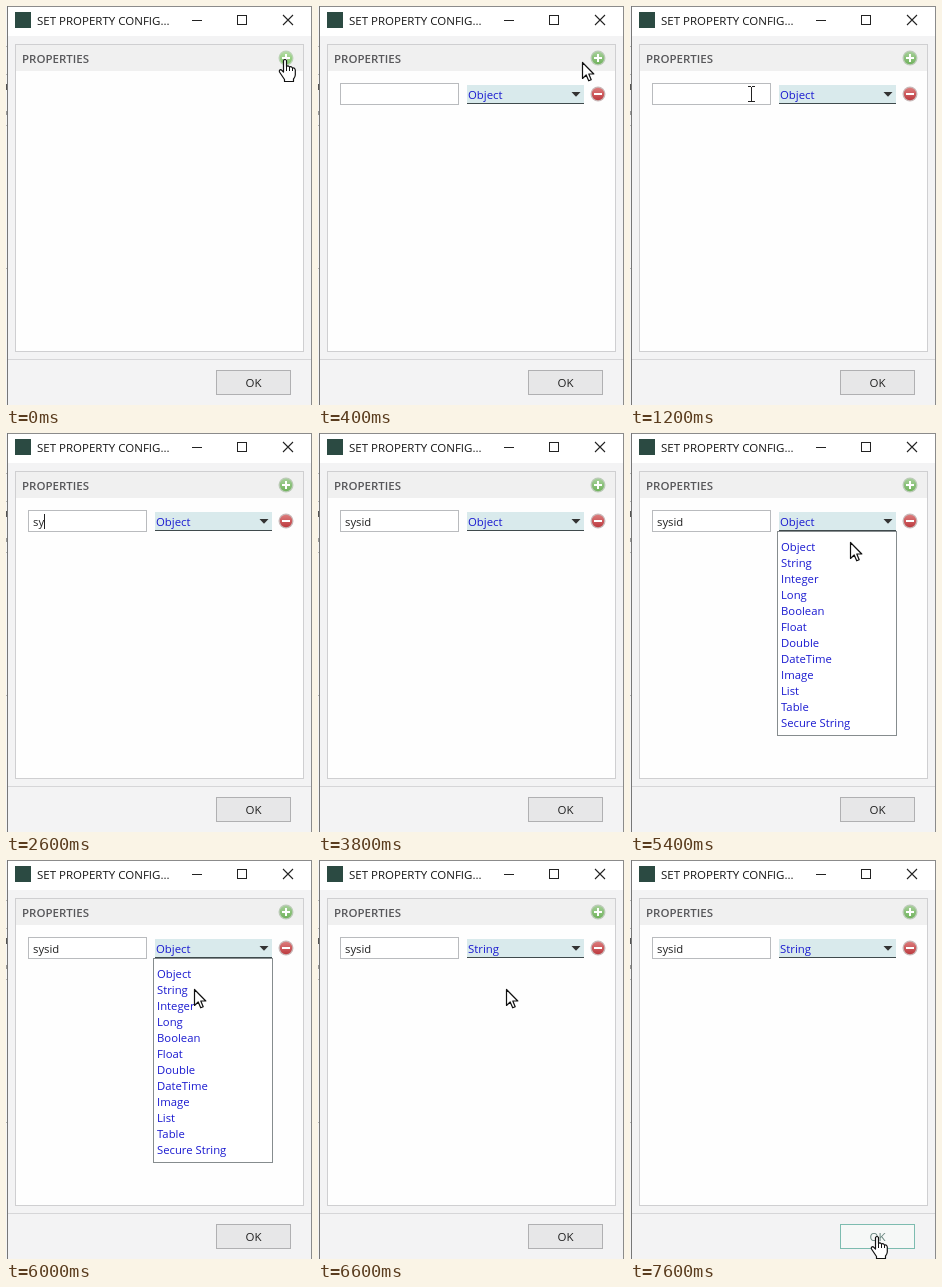
An HTML page with a canvas for the animation above (7800 ms loop, 306x399 px).

```html
<!DOCTYPE html>
<html lang="en">
<head>
<meta charset="utf-8">
<title>Set property dialog</title>
<style>
  html, body { margin: 0; width: 100%; height: 100%; overflow: hidden; background: #f3f3f4; }
  canvas { display: block; }
</style>
</head>
<body>
<canvas id="stage" width="306" height="399"></canvas>
<script>
const ctx = document.getElementById('stage').getContext('2d');
const LOOP = 7800, TICK = 200;
const BLUE = '#1a1ad0';
const TYPES = ['Object', 'String', 'Integer', 'Long', 'Boolean', 'Float', 'Double',
  'DateTime', 'Image', 'List', 'Table', 'Secure String'];

// Pointer hot spot: time, x, y
const PATH = [
  [0, 279, 53], [200, 279, 53], [1200, 121, 88], [4000, 125, 88], [4800, 239, 85],
  [5000, 239, 85], [5400, 220, 109], [5800, 188, 129], [6600, 188, 129], [7600, 247, 376]
];
// Typed text: time, number of letters
const KEYS = [[2000, 1], [2600, 2], [2800, 3], [3000, 4], [3200, 5]];

const ease = u => (1 - Math.cos(Math.PI * u)) / 2;
const between = (t, a, b) => t >= a && t < b;
const inside = (p, x, y, w, h) => between(p.x, x, x + w) && between(p.y, y, y + h);

function rect(x, y, w, h, fill) {
  ctx.fillStyle = fill;
  ctx.fillRect(x, y, w, h);
}

function box(x, y, w, h, fill, border) {
  rect(x, y, w, h, border);
  rect(x + 1, y + 1, w - 2, h - 2, fill);
}

function text(str, x, y, color, size = 11.5, weight = 400) {
  ctx.font = `${weight} ${size}px "Open Sans", "Noto Sans", sans-serif`;
  ctx.fillStyle = color;
  ctx.fillText(str, x, y);
}

function lines(color, width, ...paths) {
  ctx.strokeStyle = color;
  ctx.lineWidth = width;
  ctx.beginPath();
  for (const [x1, y1, x2, y2] of paths) {
    ctx.moveTo(x1, y1);
    ctx.lineTo(x2, y2);
  }
  ctx.stroke();
}

function pointerAt(t) {
  let i = PATH.length - 1;
  while (PATH[i][0] > t) i--;
  const [t0, x0, y0] = PATH[i];
  const [t1, x1, y1] = PATH[i + 1] || [LOOP, x0, y0];
  const u = ease((t - t0) / (t1 - t0));
  return { x: Math.round(x0 + (x1 - x0) * u), y: Math.round(y0 + (y1 - y0) * u) };
}

function drawFrame() {
  rect(0, 0, 306, 399, '#f3f3f4');
  rect(0, 0, 306, 30, '#ffffff');
  rect(0, 0, 306, 1, '#8b8b8b');
  rect(0, 0, 1, 399, '#f4f4f4');
  for (const y of [40, 68, 119, 262]) rect(0, y, 1, 1, '#b5b5b5');
  rect(0, 78, 1, 6, '#555');
  rect(0, 105, 1, 4, '#999');
  rect(1, 0, 1, 399, '#777');
  rect(305, 0, 1, 399, '#8b8b8b');

  ctx.fillStyle = '#2b4a42';
  ctx.fillRect(9, 6, 16, 16);
  text('SET PROPERTY CONFIG...', 31, 18.5, '#161616');
  rect(186, 14, 10, 1, '#222');
  ctx.strokeStyle = '#222';
  ctx.lineWidth = 1;
  ctx.strokeRect(231.5, 9.5, 9, 9);
  lines('#222', 1.1, [277, 9, 287, 19], [287, 9, 277, 19]);

  box(9, 38, 289, 308, '#fefefe', '#cfcfd1');
  rect(10, 39, 287, 26, '#f0f0f0');
  text('PROPERTIES', 16, 56.5, '#57575a', 11.5, 600);
  rect(2, 353, 303, 1, '#d6d6d8');
}

function roundIcon(y, rim, top, bottom, plus) {
  const shade = ctx.createLinearGradient(0, y - 6, 0, y + 6);
  shade.addColorStop(0, top);
  shade.addColorStop(1, bottom);
  ctx.fillStyle = rim;
  ctx.beginPath();
  ctx.arc(280, y, 7.5, 0, 7);
  ctx.fill();
  ctx.fillStyle = shade;
  ctx.beginPath();
  ctx.arc(280, y, 6.2, 0, 7);
  ctx.fill();
  rect(276, y - 1, 8, 2, '#fff');
  if (plus) rect(279, y - 4, 2, 8, '#fff');
}

function drawRow(t) {
  box(22, 77, 119, 22, '#ffffff', '#b9bbbe');
  const typed = KEYS.filter(k => k[0] <= t).length;
  const word = 'sysid'.slice(0, typed);
  text(word, 27, 93, '#222', 11.3);
  if (between(t, 1400, 1600) || between(t, 2600, 3200)) {
    rect(Math.round(27 + ctx.measureText(word).width), 81, 1, 15, '#222');
  }

  rect(149, 79, 117, 18, '#d9eaec');
  rect(149, 97, 117, 1, '#3f4a4c');
  text(t < 6200 ? 'Object' : 'String', 150, 93, BLUE, 11.4);
  ctx.fillStyle = '#333';
  ctx.beginPath();
  ctx.moveTo(253.5, 86);
  ctx.lineTo(262.5, 86);
  ctx.lineTo(258, 90.7);
  ctx.fill();
  roundIcon(88, '#c9b9b9', '#dc7b7b', '#bd3b40', false);
}

function drawList() {
  box(147, 98, 120, 205, '#ffffff', '#868c8e');
  TYPES.forEach((name, i) => text(name, 151, 118 + 16 * i, BLUE, 11.3));
}

function drawButton(hover) {
  if (hover) box(210, 364, 75, 25, '#f6f8f7', '#7dbcb0');
  else box(210, 364, 75, 25, '#e7e7e8', '#b0b0b2');
  text('OK', 239.5, 381, hover ? '#65837c' : '#222');
}

function outlined(d, x, y) {
  const shape = new Path2D(d);
  ctx.save();
  ctx.translate(x, y);
  ctx.lineJoin = 'round';
  ctx.fillStyle = '#fff';
  ctx.strokeStyle = '#111';
  ctx.lineWidth = 1.2;
  ctx.fill(shape);
  ctx.stroke(shape);
  ctx.restore();
}

function drawArrow({ x, y }) {
  outlined('M.5 .5V16.5L4.2 13L6.7 18.8L9.2 17.7L6.8 12H11.8Z', x, y);
}

function drawHand({ x, y }) {
  outlined('M-1.5 1.5Q0 -.5 1.5 1.5V7.5Q3 6 4.5 8Q6.3 7 7.5 9Q9.8 8.3 10.3 11' +
    'V16Q10 18.5 8.5 20V22.5H-.5V20.5L-5.5 13Q-6.2 10.6 -4 10.6L-1.5 13Z', x, y);
  lines('#111', 1, [x + 1.5, y + 7, x + 1.5, y + 12], [x + 4.5, y + 8, x + 4.5, y + 12],
    [x + 7.5, y + 9, x + 7.5, y + 12]);
}

function drawBeam({ x, y }) {
  rect(x, y - 7, 1, 15, '#222');
  for (const dy of [-8, 7]) {
    rect(x - 3, y + dy, 3, 1, '#222');
    rect(x + 1, y + dy, 3, 1, '#222');
  }
}

function draw(t) {
  const p = pointerAt(t);
  const onPlus = inside(p, 272, 45, 16, 15);
  const onOk = inside(p, 210, 364, 75, 25);
  const onField = t >= 200 && inside(p, 22, 77, 119, 22);

  drawFrame();
  if (onPlus) roundIcon(52, '#bcd3b6', '#b3dca4', '#7fc267', true);
  else roundIcon(52, '#bccbb8', '#a5cf98', '#71b35d', true);
  if (t >= 200) drawRow(t);
  if (between(t, 5200, 6200)) drawList();
  drawButton(onOk);

  if (between(t, 2000, 4000)) return;
  if (onPlus || onOk) drawHand(p);
  else if (onField) drawBeam(p);
  else drawArrow(p);
}

const start = performance.now();
function loop() {
  const t = (performance.now() - start) % LOOP;
  draw(Math.floor(t / TICK) * TICK);
  requestAnimationFrame(loop);
}
loop();
</script>
</body>
</html>
```
